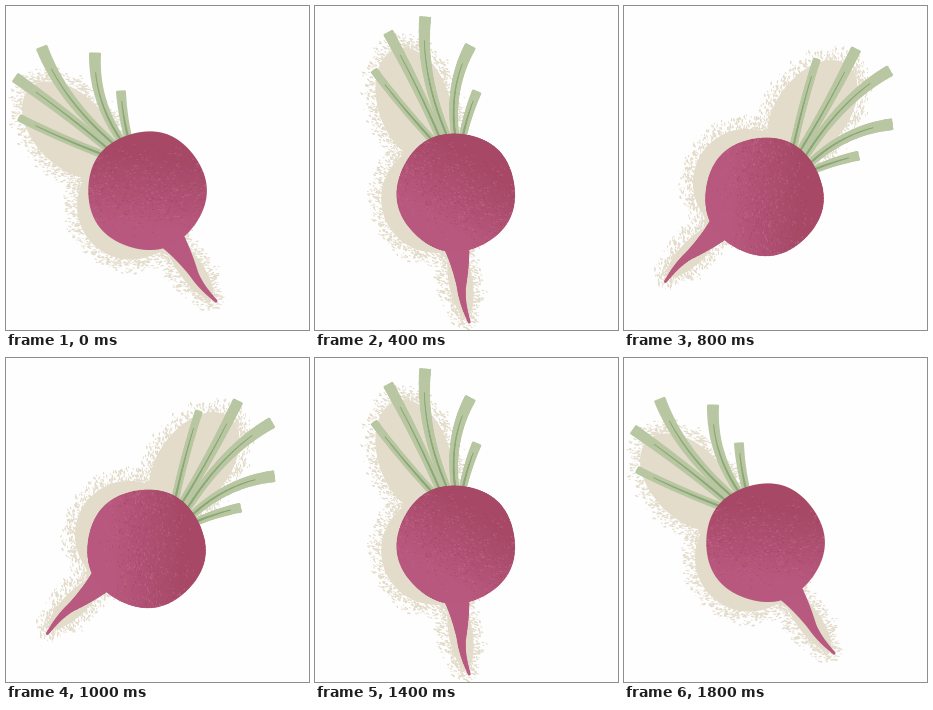
An HTML page with a canvas that plays this animation: 303x324 px, repeating every 1900 ms.

```html
<!DOCTYPE html>
<html lang="en">
<head>
<meta charset="utf-8">
<title>Beetroot</title>
<style>
  html, body { margin: 0; width: 100%; height: 100%; overflow: hidden; background: #fefefe; }
  canvas { display: block; width: 303px; height: 324px; }
</style>
</head>
<body>
<canvas width="303" height="324"></canvas>
<script>
const W = 303, H = 324, PAPER = '#fefefe', DETAIL = 2;
const PIVOT = { x: 138, y: 188 };
const BODY = { x: 141, y: 184.7, r: 59.3 };
const STEP = 100, STEPS = 19;

let seed = 7;
const random = () => (seed = (seed * 16807) % 2147483647) / 2147483647;
const spread = size => (random() + random() - 1) * size;
const mix = (a, b, t) => a + (b - a) * t;

const sprite = document.createElement('canvas');
sprite.width = W * DETAIL;
sprite.height = H * DETAIL;
const art = sprite.getContext('2d');
art.scale(DETAIL, DETAIL);
art.lineJoin = 'round';

function trace(points) {
  art.beginPath();
  points.forEach(p => art.lineTo(...p));
  art.closePath();
}

function speck(x, y, size, color) {
  art.fillStyle = color;
  art.beginPath();
  art.ellipse(x, y, size * 1.5, size * 0.7, spread(0.5), 0, 7);
  art.fill();
}

// Quadratic brush stroke with soft corners, its width going from w0 to w1.
function taper([p, c, q], w0, w1, color, from = 0) {
  const corner = Math.min(3, w0 / 2), left = [], right = [];
  for (let i = 0; i <= 16; i++) {
    const t = mix(from, 1, i / 16);
    const at = k => mix(mix(p[k], c[k], t), mix(c[k], q[k], t), t);
    const slope = k => mix(c[k] - p[k], q[k] - c[k], t);
    const r = (mix(w0, w1, i / 16) - corner) / 2 / Math.hypot(slope(0), slope(1));
    left.push([at(0) - slope(1) * r, at(1) + slope(0) * r]);
    right.unshift([at(0) + slope(1) * r, at(1) - slope(0) * r]);
  }
  trace(left.concat(right));
  art.fillStyle = art.strokeStyle = color;
  art.lineWidth = corner;
  art.fill();
  art.stroke();
}

// Ellipse of dry paint that crumbles into specks at its rim.
function cloud(x, y, rx, ry, tilt, color = '#e3dccb') {
  const rim = 6;
  art.fillStyle = color;
  art.beginPath();
  art.ellipse(x, y, rx - rim, ry - rim, tilt, 0, 7);
  art.fill();
  for (let i = 0; i < (rx + ry) * 12; i++) {
    const a = random() * 2 * Math.PI, out = spread(12) - rim / 2;
    const u = (rx + out) * Math.cos(a), v = (ry + out) * Math.sin(a);
    speck(x + u * Math.cos(tilt) - v * Math.sin(tilt),
      y + u * Math.sin(tilt) + v * Math.cos(tilt), 0.4 + random() * 0.8, color);
  }
}

function drawShadow() {
  cloud(BODY.x - 16, BODY.y + 15, 60, 60, 0);
  cloud(64, 124, 64, 42, 0.8);
  cloud(184, 262, 42, 18, 0.95);
}

function drawLeaves() {
  const leaves = [ // tip x, tip y, sideways bend, width
    [14, 112, 4, 8], [10, 72, -4, 11], [36, 42, 17, 12], [89, 48, 15, 12], [115, 86, 2, 10]
  ];
  leaves.forEach(([x, y, bend, width], i) => {
    const base = [98 + 6 * i, 149 - 4.5 * i];
    const curve = [[x, y], [mix(x, base[0], 0.5) - bend, mix(y, base[1], 0.5) + bend / 5], base];
    taper(curve, width, 8, '#b8c7a1');
    taper(curve, 1, 2.4, '#8ba776', 0.2);
  });
}

function drawRoot() {
  const pink = '#b8597f', knee = [188, 268];
  taper([[164, 231], [177, 247], knee], 27, 9, pink);
  taper([knee, [195, 281], [210, 295]], 9, 3, pink);
}

function drawBody() {
  const outline = [];
  for (let a = 0; a < 2 * Math.PI; a += 0.05) {
    const r = BODY.r + 0.6 * Math.cos(5 * a);
    outline.push([BODY.x + r * Math.cos(a), BODY.y + r * Math.sin(a)]);
  }
  const skin = art.createLinearGradient(148, 128, 132, 240);
  skin.addColorStop(0.2, '#a64866');
  skin.addColorStop(0.8, '#b8587e');
  trace(outline);
  art.fillStyle = skin;
  art.fill();

  art.save();
  art.clip();
  for (let i = 0; i < 1100; i++) {
    speck(BODY.x + (random() * 2 - 1) * BODY.r, BODY.y + spread(48), 0.3 + random() * 0.6,
      i % 2 ? 'rgba(198,112,146,.45)' : 'rgba(158,66,96,.45)');
  }
  art.restore();
}

drawShadow();
drawLeaves();
drawRoot();
drawBody();

const stage = document.querySelector('canvas').getContext('2d');

function draw(now) {
  const step = Math.floor(now / STEP) % STEPS;
  const k = Math.min(step, STEPS - 1 - step);
  // Slow start, steady swing, slight braking before turning back.
  const angle = k * k * (1.65 - 0.0175 * (k - 3.34) ** 2);
  const drift = -3.6 * Math.sin(Math.PI * (angle / 88) ** 2);

  stage.setTransform(1, 0, 0, 1, 0, 0);
  stage.fillStyle = PAPER;
  stage.fillRect(0, 0, W, H);
  stage.translate(PIVOT.x + drift, PIVOT.y);
  stage.rotate(angle * Math.PI / 180);
  stage.drawImage(sprite, -PIVOT.x, -PIVOT.y, W, H);
  requestAnimationFrame(draw);
}
requestAnimationFrame(draw);
</script>
</body>
</html>
```
